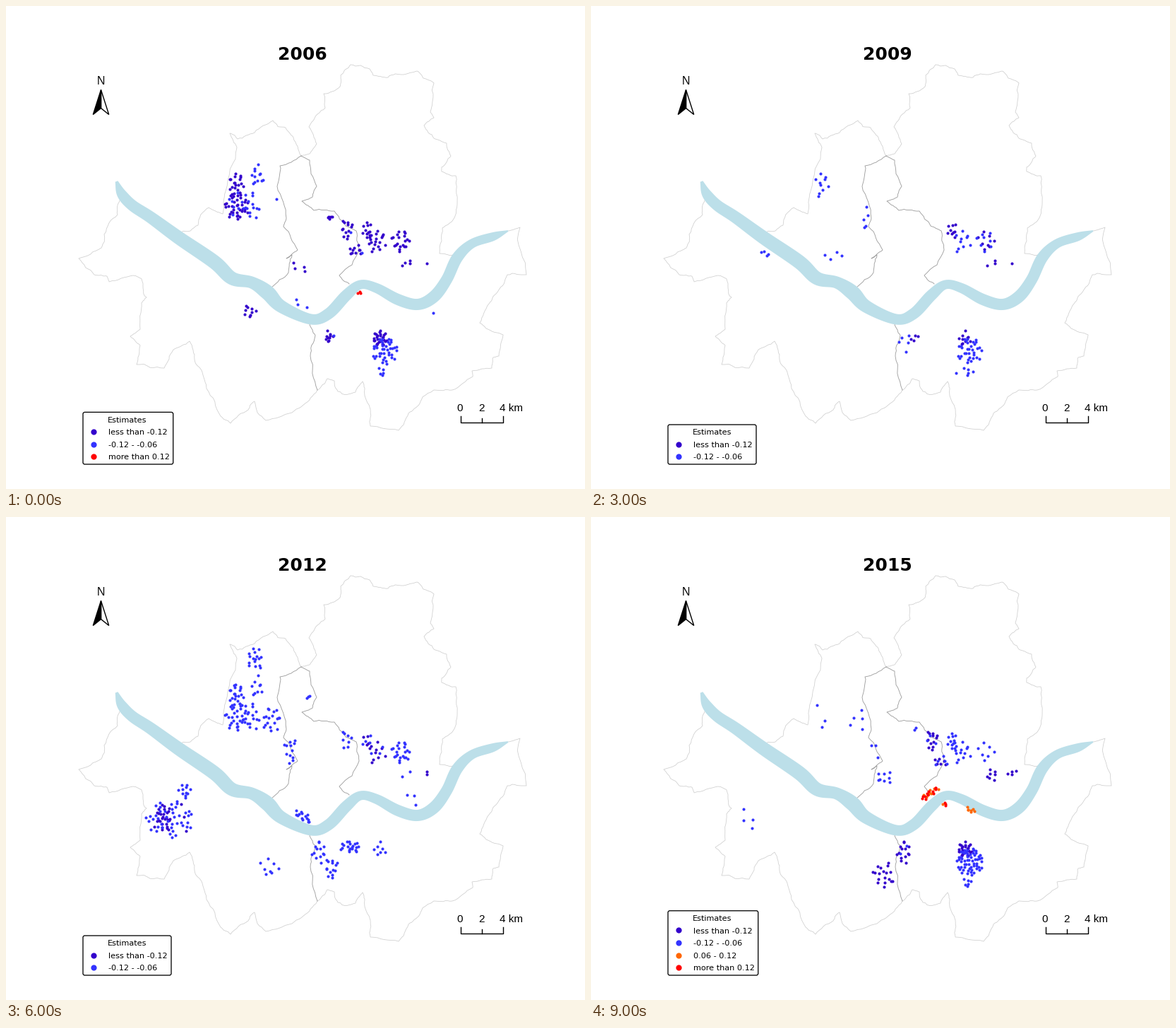
Animation of 820 by 683 pixels, one loop 10000 ms. Source, as a matplotlib script:

```python
import numpy as np
import matplotlib.pyplot as plt
from matplotlib.animation import ArtistAnimation
from matplotlib.patches import FancyBboxPatch, Polygon

W, H, DPI = 820, 683, 100
PT = 72 / DPI
YEARS = range(2006, 2016)
COLORS = ["#3300cc", "#3333ff", "#33ccff", "#ffcc00", "#ff6600", "#ff0000"]
LABELS = ["less than -0.12", "-0.12 - -0.06", "-0.06 - 0.0",
          "0.0 - 0.06", "0.06 - 0.12", "more than 0.12"]
NAVY, BLUE, CYAN, YELLOW, ORANGE, RED = range(6)

plt.rcParams["font.family"] = "DejaVu Sans"
fig = plt.figure(figsize=((W + .01) / DPI, (H + .01) / DPI), dpi=DPI,
                 facecolor="white")
ax = fig.add_axes([0, 0, 1, 1])
ax.set(xlim=(0, W), ylim=(H, 0))
ax.axis("off")


# ---- base map ----
def rough(pts, seed, rounds=3, amp=.06):
    """Midpoint displacement: a ragged border through a few key points."""
    rng = np.random.default_rng(seed)
    p = np.array(pts, float)
    for _ in range(rounds):
        d = np.diff(p, axis=0)
        side = np.c_[-d[:, 1], d[:, 0]] * rng.normal(0, amp, (len(d), 1))
        q = np.empty((2 * len(p) - 1, 2))
        q[::2], q[1::2] = p, p[:-1] + d / 2 + side
        p = q
    return p


def spline(pts, steps=10):
    """Catmull-Rom curve through the points."""
    p = np.array(pts, float)
    p = np.vstack([2 * p[0] - p[1], p, 2 * p[-1] - p[-2]])
    t = np.linspace(0, 1, steps, endpoint=False)[:, None]
    parts = [b + t / 2 * (c - a + t * (2 * a - 5 * b + 4 * c - d
                                       + t * (3 * (b - c) + d - a)))
             for a, b, c, d in zip(p, p[1:], p[2:], p[3:])]
    return np.vstack(parts + [p[-2]])


northeast = [
    (418, 212), (430, 209), (440, 195), (429, 171), (440, 154), (452, 144),
    (450, 124), (473, 114), (474, 98), (488, 83), (515, 89), (520, 98),
    (541, 101), (563, 97), (582, 92), (591, 102), (606, 109), (601, 150),
    (606, 158), (592, 169), (606, 187), (624, 194), (630, 212), (617, 228),
    (617, 234), (637, 240), (639, 280), (634, 301), (618, 314), (614, 350),
    (633, 352)]
southeast = [
    (711, 318), (728, 313), (737, 380), (710, 380), (697, 403), (684, 421),
    (671, 448), (680, 456), (704, 465), (698, 495), (690, 497), (688, 512),
    (660, 516), (661, 524), (632, 543), (606, 543), (590, 553), (586, 562),
    (570, 576), (556, 600), (516, 594), (516, 570), (508, 551), (505, 531),
    (495, 546), (470, 545), (465, 530), (455, 527), (441, 543)]
southwest = [
    (441, 543), (430, 557), (405, 575), (368, 586), (352, 559), (343, 571),
    (318, 590), (304, 580), (284, 541), (278, 518), (267, 500), (260, 474),
    (237, 486), (224, 512), (185, 507), (190, 480), (176, 467), (190, 457),
    (192, 420), (199, 412), (192, 386), (180, 381), (146, 390), (143, 382),
    (125, 380), (103, 357), (135, 342), (139, 323), (158, 295), (161, 275)]
northwest = [
    (248, 320), (272, 310), (287, 285), (307, 294), (311, 262), (327, 200),
    (317, 180), (328, 188), (352, 179), (378, 162), (396, 172), (407, 186),
    (418, 212)]
inner_west = [
    (418, 212), (388, 226), (384, 255), (397, 300), (393, 312), (413, 345),
    (397, 357), (405, 352), (400, 377), (376, 398)]
inner_east = [
    (418, 212), (430, 218), (440, 255), (434, 270), (419, 276), (436, 289),
    (465, 290), (481, 311), (496, 318), (500, 345), (472, 381), (486, 393)]
inner_south = [(430, 450), (438, 466), (431, 495), (441, 543)]

for k, line in enumerate([northeast, southeast, southwest, northwest]):
    ax.plot(*rough(line, k).T, color="#d0d0d0", lw=.8 * PT, zorder=1)
for k, line in enumerate([inner_west, inner_east, inner_south]):
    ax.plot(*rough(line, k + 10).T, color="#a0a0a0", lw=.9 * PT, zorder=1)

# river: centre line with half width
river = spline([
    (156.5, 248, 2), (164, 266, 7), (179, 282, 8), (205, 299, 8.5),
    (245, 328, 9.5), (295, 362, 10), (320, 385, 9.5), (348, 391, 8.5),
    (370, 405, 10.5), (390, 425, 9), (432, 443, 7.5), (457, 435, 8),
    (482, 409, 8), (502, 394, 6.5), (525, 399, 7), (555, 415, 8),
    (583, 422, 8), (606, 411, 8.5), (624, 387, 8), (639, 356, 8),
    (660, 336, 6.5), (690, 326, 6), (711, 318, 1)])
mid, half = river[:, :2], river[:, 2:]
tangent = np.gradient(mid, axis=0)
normal = np.c_[-tangent[:, 1], tangent[:, 0]]
normal *= half / np.hypot(*tangent.T)[:, None]
ax.add_patch(Polygon(np.vstack([mid + normal, (mid - normal)[::-1]]),
                     fc="#bcdfe9", lw=0, zorder=2))


def label(x, y, s, px, ha="center", **kw):
    return ax.text(x, y, s, fontsize=px * PT, ha=ha, va="baseline", zorder=6,
                   **kw)


# north arrow and scale bar
label(134.5, 111.3, "N", 16, family="Liberation Sans")
tip, notch = (134.5, 118.5), (134.5, 144.5)
for x, fill in [(145.7, "white"), (123.3, "black")]:
    ax.add_patch(Polygon([tip, (x, 153.5), notch], fc=fill, ec="black",
                         lw=1.4 * PT))
ax.plot([643.5, 643.5, 703.5, 703.5], [580, 589, 589, 580], color="black",
        lw=1.4 * PT)
ax.plot([673.5, 673.5], [583, 589], color="black", lw=1.4 * PT)
for x, s, ha in [(643, "0", "center"), (673.3, "2", "center"),
                 (698.5, "4 km", "left")]:
    label(x, 573, s, 15.2, ha, family="Liberation Sans")

# ---- neighbourhoods: x, y, radius x, radius y, optional slope ----
north = dict(
    jingwan=(352, 200, 12, 19), bulgwang=(355, 240, 9, 17),
    eungam=(325, 252, 12, 19), sinsa=(326, 282, 17, 20),
    nokbeon=(348, 282, 14, 21), hongje=(375, 286, 13, 19),
    hongeun=(388, 301, 5, 18), muak=(402, 330, 9, 20),
    susaek=(281, 304, 5, 6), yeonhui=(343, 350, 15, 13),
    sinchon=(358, 373, 8, 11), ahyeon=(384, 383, 16, 19),
    jung=(416, 368, 12, 9), buam=(427, 254, 3, 2), suyu=(500, 186, 12, 7),
    jeongneung=(483, 262, 15, 28), gireum=(504, 276, 10, 13),
    donam=(458, 298, 4, 4), bomun=(482, 315, 8, 15), jegi=(511, 318, 8, 15),
    sinseol=(495, 345, 10, 8), cheongnyangni=(524, 332, 14, 17),
    myeonmok=(558, 332, 13, 15), mangu=(588, 332, 10, 14),
    junggok=(566, 364, 8, 9), guui=(595, 360, 9, 6), jayang=(576, 399, 15, 13))
south = dict(
    yeomchang=(245, 350, 6, 7), mokdong=(258, 360, 11, 11),
    hwagok=(222, 375, 12, 3, -.4), gocheok=(252, 387, 10, 10),
    sinwol=(223, 425, 11, 19), sinjeong=(231, 426, 34, 27),
    gaebong=(228, 436, 27, 3, -.25), oryu=(213, 471, 17, 17),
    guro=(246, 455, 21, 22), sindorim=(275, 460, 11, 19),
    yeouido=(345, 431, 10, 8), hapjeong=(357, 415, 11, 5, .9),
    yongsan=(420, 423, 12, 6, .5), daerim=(347, 484, 7, 11),
    singil=(371, 495, 15, 13), bongcheon=(414, 505, 17, 19),
    sadang=(442, 473, 9, 16), bangbae=(457, 467, 7, 9),
    nambu=(460, 496, 9, 16), seocho=(487, 466, 16, 9),
    yangjae=(500, 481, 25, 19))
gangnam = dict(
    oksu=(479, 390, 14, 5, -.6), seongsu=(544, 398, 16, 3, .2),
    apgujeong=(500, 405, 3, 3), cheongdam=(526, 409, 17, 2, .2),
    yeongdong=(537, 414, 7, 3, .4), nonhyeon=(510, 425, 18, 14),
    samseong=(537, 430, 13, 5, -.4), yeoksam=(529, 470, 10, 11),
    daechi=(536, 486, 19, 20), gaepo=(531, 517, 8, 7),
    suseo=(562, 485, 26, 21), jamsil=(595, 447, 21, 18),
    segok=(535, 510, 42, 13), garak=(600, 492, 10, 4))
towns = {**north, **south, **gangnam}


def houses(town, start, n):
    """Part of a town's fixed, evenly spread sequence of houses."""
    x, y, rx, ry, *slope = towns[town]
    phase = .37 * list(towns).index(town)
    k = np.arange(start, start + n)
    r = np.sqrt((phase + .7549 * k) % 1)
    a = 2 * np.pi * ((phase + .5698 * k) % 1)
    dx = rx * r * np.cos(a) + .8 * np.sin(7 * k)
    dy = ry * r * np.sin(a) + .8 * np.cos(11 * k)
    return np.c_[x + dx, y + dy + sum(slope) * dx] + .5


estimates = {year: {} for year in YEARS}


def add(year, level, **counts):
    estimates[year][level] = counts


add(2006, NAVY, eungam=20, sinsa=36, donam=5, bomun=13, jegi=12, sinseol=10,
    cheongnyangni=18, myeonmok=20, junggok=4, guui=1, jung=4, yeouido=9,
    bangbae=10, yeoksam=28)
add(2006, BLUE, bulgwang=12, nokbeon=13, sinsa=8, hongje=1, bomun=1, sinseol=1,
    yongsan=3, bangbae=1, daechi=40, gaepo=5, jamsil=1)
add(2006, RED, apgujeong=3)
add(2007, NAVY, eungam=14, sinsa=16, bomun=8, jegi=12, cheongnyangni=10,
    myeonmok=12, junggok=3, bangbae=8, yeoksam=16)
add(2007, BLUE, bulgwang=6, nokbeon=8, jegi=4, cheongnyangni=6, yeouido=5,
    daechi=30, gaepo=3)
add(2008, NAVY, bangbae=14, bongcheon=3)
add(2008, BLUE, eungam=27, gaepo=2)
add(2008, ORANGE, oksu=7, seongsu=7, samseong=16)
add(2008, RED, apgujeong=6, cheongdam=14, nonhyeon=10)
add(2009, NAVY, jegi=9, myeonmok=8, junggok=3, guui=1, bangbae=4, yeoksam=10)
add(2009, BLUE, eungam=10, hongeun=5, yeonhui=4, yeomchang=4, cheongnyangni=10,
    myeonmok=8, daechi=32, gaepo=4, sadang=5, segok=3)
add(2010, NAVY, jegi=10, cheongnyangni=14, myeonmok=13, junggok=4, guui=2,
    sinwol=2, garak=2)
add(2010, BLUE, suyu=2, hongeun=13, muak=4, yeonhui=11, yeomchang=9, sinwol=5,
    bomun=2, jegi=6, sinseol=2, cheongnyangni=4, myeonmok=13, yeoksam=12,
    daechi=42, gaepo=4, suseo=11)
add(2011, NAVY, jegi=7, myeonmok=6, junggok=3, yeoksam=9, sinwol=6)
add(2011, BLUE, eungam=14, sinsa=12, hongeun=6, yeomchang=6, sinjeong=12,
    bomun=6, cheongnyangni=12, myeonmok=10, daechi=26, sadang=8, yongsan=4)
add(2011, RED, apgujeong=3)
add(2012, NAVY, jegi=5, cheongnyangni=9, guui=2, sinwol=25, sinjeong=7)
add(2012, BLUE, jingwan=16, eungam=22, bulgwang=9, sinsa=30, nokbeon=14,
    hongje=18, buam=3, muak=12, bomun=8, jegi=4, cheongnyangni=3, myeonmok=22,
    junggok=2, jayang=3, gocheok=11, sinjeong=42, singil=8, yongsan=14,
    sadang=13, seocho=20, nambu=14, yeoksam=7)
add(2013, NAVY, junggok=7, guui=4)
add(2013, BLUE, suyu=7, buam=2, jeongneung=52, gireum=11, donam=5, bomun=17,
    jegi=10, cheongnyangni=22, myeonmok=42, mangu=15, jayang=26, susaek=3,
    muak=22, yeonhui=22, sinchon=15, ahyeon=48, hapjeong=10, yongsan=8,
    guro=36, sindorim=20, oryu=17, singil=9, bongcheon=4, sadang=25,
    nambu=16, yangjae=56, seocho=8, daechi=60, suseo=44, jamsil=17,
    segok=14, garak=4)
add(2013, CYAN, eungam=12, bulgwang=18, sinsa=13, nokbeon=16, hongje=18,
    gireum=2, cheongnyangni=1, muak=3, susaek=1, gaebong=9, garak=2)
add(2013, YELLOW, apgujeong=4)
add(2013, ORANGE, apgujeong=2)
add(2014, NAVY, susaek=4, donam=3, bomun=12, jegi=14, sinseol=4, junggok=8,
    guui=2, jamsil=4, yeomchang=9, daerim=8, bongcheon=46, yeoksam=18,
    daechi=10)
add(2014, BLUE, sinsa=5, bomun=5, jegi=4, cheongnyangni=9, sinseol=2, jung=2,
    mokdong=28, hwagok=9, daerim=2, daechi=36, yeoksam=10, gaepo=6)
add(2014, ORANGE, oksu=12, yeongdong=11)
add(2015, NAVY, bomun=12, sinseol=6, junggok=7, guui=4, sadang=14,
    bongcheon=18, yeoksam=26)
add(2015, BLUE, sinsa=3, hongje=5, muak=3, donam=2, bomun=3, jegi=13,
    cheongnyangni=12, myeonmok=7, sinseol=5, jung=8, sinwol=4, sadang=2,
    daechi=58, gaepo=6)
add(2015, ORANGE, oksu=8, yeongdong=7, apgujeong=1)
add(2015, RED, oksu=12, apgujeong=3)


# ---- one artist list per year ----
def legend(levels):
    step, last = 17.6, 637.2
    top = last - step * len(levels) - 10
    right = 236.7 if RED in levels else 234
    box = FancyBboxPatch((109, top), right - 109, 648 - top,
                         boxstyle="round,pad=0,rounding_size=2.6",
                         fc="white", ec="black", lw=1.3 * PT, zorder=5)
    ax.add_patch(box)
    out = [box, label(171.6, top + 14.2, "Estimates", 11.3)]
    for k, lv in enumerate(reversed(levels)):
        y = last - step * k
        out.append(ax.scatter([124.3], [y], s=(8.2 * PT) ** 2, c=COLORS[lv],
                              lw=0, zorder=6))
        out.append(label(144.5, y + 4.2, LABELS[lv], 11.3, "left"))
    return out


def year_frame(year):
    art = [label(420, 76.3, str(year), 25, weight="bold")]
    used = dict.fromkeys(towns, 0)
    for lv, counts in sorted(estimates[year].items()):
        xy = []
        for town, n in counts.items():
            xy.append(houses(town, used[town], n))
            used[town] += n
        art.append(ax.scatter(*np.vstack(xy).T, s=(4.1 * PT) ** 2,
                              c=COLORS[lv], lw=0, zorder=4))
    return art + legend(sorted(estimates[year]))


anim = ArtistAnimation(fig, [year_frame(y) for y in YEARS], interval=1000,
                       repeat=True, repeat_delay=0)
plt.show()
```
